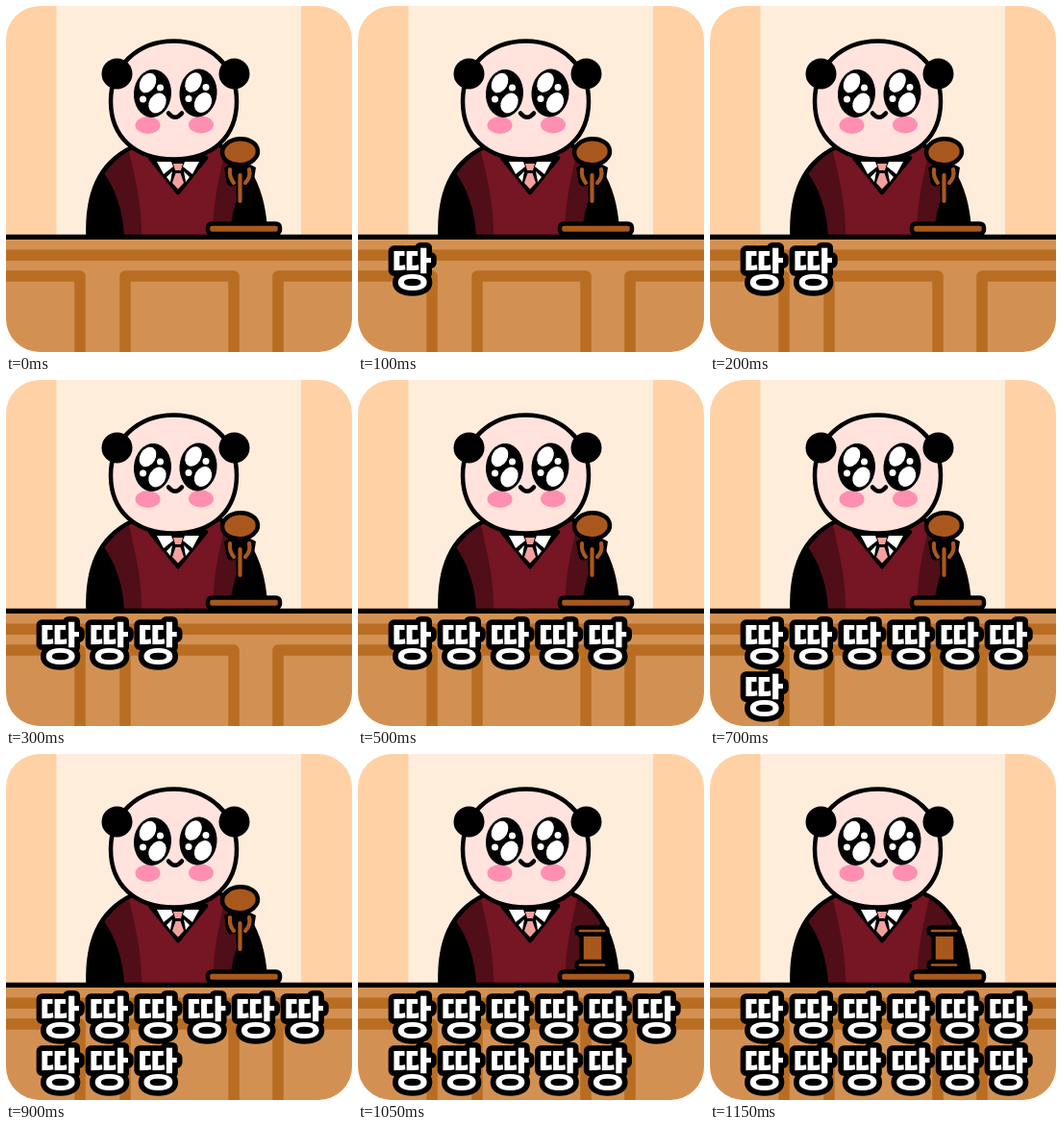
These frames come from a looping animation (360x360 px, 1.2 s). An HTML page:

```html
<!DOCTYPE html>
<html lang="ko">
<head>
<meta charset="utf-8">
<title>Judge</title>
<style>
  html, body { margin: 0; width: 100%; height: 100%; overflow: hidden; background: #fff; }
  svg { display: block; width: 100vw; height: 100vh; }
  .ink { stroke: #000; stroke-width: 4.5; stroke-linejoin: round; stroke-linecap: round; }
  text {
    font: 900 46.5px "Noto Sans CJK KR", "Noto Sans CJK", "Noto Sans CJK JP", sans-serif;
    text-anchor: middle; fill: #fff; stroke: #000; stroke-width: 11.5;
    stroke-linejoin: round; paint-order: stroke;
  }
</style>
</head>
<body>
<svg viewBox="0 0 360 360">
  <defs>
    <clipPath id="card"><rect width="360" height="360" rx="35"/></clipPath>
    <clipPath id="torso"><path d="M85 240C84 196 96 164 131 147H222C251 158 269 191 270 240Z"/></clipPath>
  </defs>
  <g clip-path="url(#card)">
    <rect width="360" height="360" fill="#ffd1a5"/>
    <rect x="52.500" width="254.500" height="240" fill="#ffeddc"/>

    <g clip-path="url(#torso)">
      <rect x="80" y="140" width="195" height="102"/>
      <path d="M102 174L131 142H225L254 174C241 192 234 216 233 240H123C122 216 115 192 102 174Z" fill="#500e19"/>
      <path d="M126 140H230C224 174 216 192 215 240H141.500C140 192 132 174 126 140Z" fill="#761523"/>
      <path class="ink" d="M150 158L179 194L208 158Z" fill="#000"/>
      <path d="M157 162H172L174 167L164 175ZM201 162H186L184 167L194 175ZM167 178L173 172L171 183ZM191 178L185 172L187 183Z" fill="#fff"/>
      <path d="M174 164H184L182 171H176ZM176.500 174H181.500L185 184L179 190.500L173 184Z" fill="#f3a09c"/>
    </g>
    <path class="ink" d="M85.500 240C84 196 96 164 131 147M222 145C251 158 269 191 270 240" fill="none"/>

    <path class="ink" d="M174.500 36.500C212 36.500 240 63 240 99C240 136 215 159.500 174.500 159.500C134 159.500 109 136 109 99C109 63 137 36.500 174.500 36.500Z" fill="#ffe3dc"/>
    <circle cx="115.500" cy="70.500" r="16"/>
    <circle cx="237.500" cy="70.500" r="16"/>
    <ellipse cx="147.500" cy="124" rx="13" ry="9" fill="#ff8fb0"/>
    <ellipse cx="203" cy="123.500" rx="13" ry="9" fill="#ff8fb0"/>
    <g id="eyes"></g>
    <path class="ink" d="M169 111.500Q176 120 183 111.500" fill="none"/>

    <rect y="240" width="360" height="120" fill="#d29153"/>
    <rect y="253.500" width="360" height="11.500" fill="#b96d22"/>
    <g fill="none" stroke="#b96d22" stroke-width="11.500" stroke-linejoin="round">
      <path d="M-10 281H77V370M124 370V281H237V370M283 370V281H370"/>
    </g>
    <path d="M0 240.300H360" stroke="#000" stroke-width="5.200"/>

    <rect class="ink" x="210" y="226.500" width="75" height="10.500" rx="4" fill="#a9581d"/>
    <g id="raised">
      <path d="M227 168Q243 158 260 168L258 181Q254 189 248 187L247 203Q243.500 208 240 203L239 187Q230 190 229 181Z"/>
      <path d="M233 170Q232 178 237 184M253 170Q255 178 249 184M243.500 176V203" fill="none" stroke="#a9581d" stroke-width="4.200" stroke-linecap="round"/>
      <ellipse class="ink" cx="243.500" cy="151.800" rx="18.500" ry="13.500" transform="rotate(-4 243.500 151.800)" fill="#a9581d"/>
    </g>
    <g id="struck" class="ink" fill="#a9581d" opacity="0">
      <rect x="232.500" y="186" width="23" height="32"/>
      <rect x="227.500" y="180.500" width="32" height="7" rx="3"/>
      <rect x="227.500" y="216" width="32" height="7" rx="3"/>
    </g>
    <g id="words"></g>
  </g>
</svg>
<script>
  const NS = "http://www.w3.org/2000/svg";
  const BEAT = 100, COLS = 6, COUNT = 12, LOOP = BEAT * COUNT;
  const byId = id => document.getElementById(id);

  function add(parent, tag, attrs, text = "") {
    const el = document.createElementNS(NS, tag);
    for (const key in attrs) el.setAttribute(key, attrs[key]);
    el.textContent = text;
    parent.append(el);
    return el;
  }

  // Hard switch from one opacity to the other at a point in the cycle.
  function flip(el, from, at, duration) {
    const to = 1 - from;
    el.animate([
      { opacity: from, offset: 0 }, { opacity: from, offset: at },
      { opacity: to, offset: at }, { opacity: to, offset: 1 }
    ], { duration, iterations: Infinity });
  }

  function oval(parent, x, y, rx, ry, fill, tilt = 0) {
    add(parent, "ellipse", { rx, ry, fill, transform: `translate(${x} ${y}) rotate(${tilt})` });
  }

  for (const [x, y] of [[152.5, 91], [200, 90.5]]) {
    const eye = add(byId("eyes"), "g", { transform: `translate(${x} ${y})` });
    oval(eye, 0, 0, 19.5, 25, "#000", 4);
    oval(eye, -5, -11, 8, 11, "#fff", 30);
    oval(eye, 5, 10, 8.5, 11, "#fff", 30);
    oval(eye, 8, -6, 3.5, 3.5, "#fff");
    oval(eye, -10, 6, 3.5, 3.5, "#fff");
  }

  flip(byId("raised"), 1, 0.5, BEAT);
  flip(byId("struck"), 0, 0.5, BEAT);

  for (let i = 0; i < COUNT; i++) {
    const x = 56 + (i % COLS) * 50.8;
    const y = 290.5 + Math.floor(i / COLS) * 54.3;
    const word = add(byId("words"), "text", { x, y, opacity: 0 }, "땅");
    flip(word, 0, (i + 0.5) * BEAT / LOOP, LOOP);
  }
</script>
</body>
</html>
```
